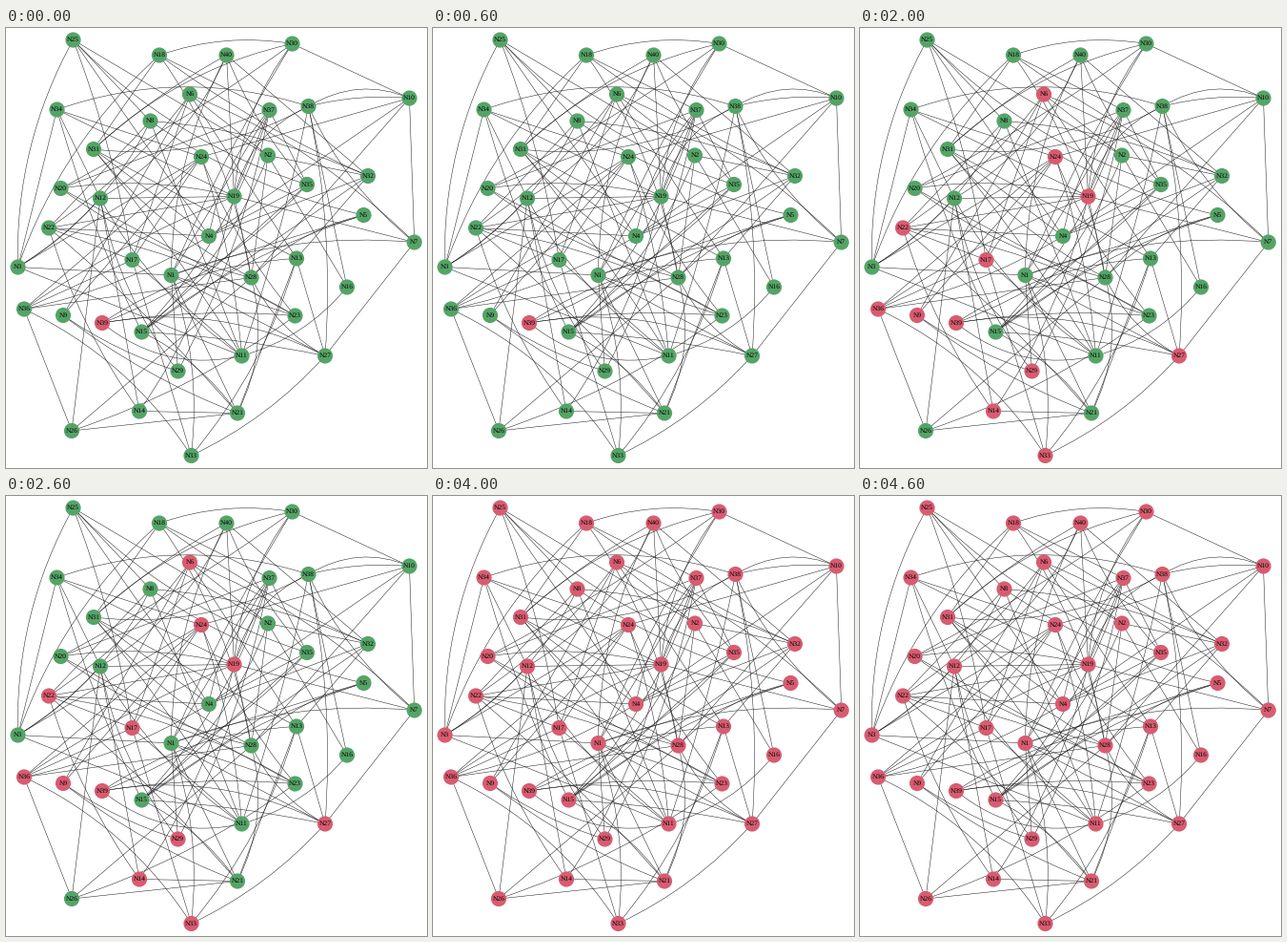
These frames come from a looping animation (442 px wide and 461 px high, 5000 ms). A matplotlib script:

```python
import random

import numpy as np
import matplotlib.pyplot as plt
from matplotlib.animation import FuncAnimation
from matplotlib.patches import Circle, PathPatch
from matplotlib.path import Path

W, H, DPI = 442, 461, 100
PX = 72 / DPI
RADIUS, CLEARANCE = 8.1, 15
HEALTHY, INFECTED = "#55a467", "#d85c70"
EDGE = "#1c1c1c"

plt.rcParams["text.hinting"] = "none"
rng = random.Random(12)

# Node centres for N1, N2, ... N40
nodes = np.array([
    (173.5, 259), (275, 133.5), (12.5, 250.5), (213, 218), (375.5, 196),
    (193, 69.5), (428.7, 224.5), (151.5, 97.5), (60, 301), (423.5, 73.5),
    (247.5, 343.5), (99, 178.5), (305, 241.5), (140, 401.5), (142.5, 318.5),
    (358, 271.5), (132.5, 243), (161, 28.5), (239.5, 176.5), (57.5, 168),
    (243, 403.5), (45, 209.5), (303.5, 301.5), (205, 135), (70.5, 12.5),
    (69, 422), (335, 343.5), (257.5, 261.5), (180.5, 359.5), (300.5, 16.5),
    (92, 127), (380, 155), (194.5, 448), (53.5, 85.5), (316, 164),
    (19, 294.5), (276.5, 86), (317.5, 82), (101, 309), (231.5, 28.5),
])
count = len(nodes)
centre = nodes.mean(axis=0)

# Links along the rim; the inner ones are drawn at random
rim = [(18, 30), (30, 10), (10, 7), (7, 27), (27, 33), (33, 36), (36, 26),
       (26, 21), (14, 21), (25, 3), (25, 8), (34, 3), (40, 32), (38, 7)]

# Nodes reached at each step of the spread
everyone = set(range(1, count + 1))
first = {39}
second = first | {17, 22, 33}
third = second | {6, 9, 14, 19, 24, 27, 29, 36}
fourth = everyone - {2, 8, 10, 16, 25, 26, 35}
steps = [first, second, third, fourth, everyone]


def fits(a, b):
    """Long enough, and crossing the middle of the graph."""
    p, q = nodes[a - 1], nodes[b - 1]
    inner = np.hypot(*((p + q) / 2 - centre)) < 155
    return inner and 85 < np.hypot(*(q - p)) < 290


def random_links(fanout=3):
    links = {tuple(sorted(pair)) for pair in rim}
    for a in sorted(everyone):
        choices = [b for b in sorted(everyone)
                   if fits(a, b) and (min(a, b), max(a, b)) not in links]
        for b in rng.sample(choices, min(fanout, len(choices))):
            links.add((min(a, b), max(a, b)))
    return sorted(links)


def detour(a, b):
    """Bow that carries a link around the nodes in its way."""
    p, q = nodes[a - 1], nodes[b - 1]
    d = q - p
    length = np.hypot(*d)
    normal = np.array([d[1], -d[0]]) / length
    bow = 0
    for i, node in enumerate(nodes, 1):
        t = (node - p) @ d / length**2
        gap = (node - p) @ normal
        if i in (a, b) or not 0.15 < t < 0.85 or abs(gap) > CLEARANCE - 3:
            continue
        side = -1 if gap > 0 else 1
        push = side * (CLEARANCE - abs(gap)) / (2 * t * (1 - t))
        bow = max(bow, push, key=abs)
    return bow * normal


def draw_link(ax, a, b, bend):
    p, q = nodes[a - 1], nodes[b - 1]
    curve = Path([p, (p + q) / 2 + bend, q],
                 [Path.MOVETO, Path.CURVE3, Path.CURVE3])
    ax.add_patch(PathPatch(curve, fc="none", ec=EDGE, lw=0.5 * PX, zorder=1))


fig = plt.figure(figsize=(W / DPI, H / DPI), dpi=DPI, facecolor="white")
ax = fig.add_axes([0, 0, 1, 1])
ax.set(xlim=(0, W), ylim=(H, 0))
ax.axis("off")

for a, b in random_links():
    draw_link(ax, a, b, detour(a, b))
for rise in (9, 27):
    draw_link(ax, 38, 10, np.array([0, -rise]))

discs = []
for i, (x, y) in enumerate(nodes, 1):
    discs.append(ax.add_patch(Circle((x, y), RADIUS, lw=0, zorder=2)))
    ax.text(x, y, f"N{i}", family="Liberation Serif", size=7.5 * PX,
            ha="center", va="center", color="black", zorder=3)


def update(k):
    for i, disc in enumerate(discs, 1):
        disc.set_facecolor(INFECTED if i in steps[k] else HEALTHY)
    return discs


anim = FuncAnimation(fig, update, frames=len(steps), interval=1000,
                     repeat=True, repeat_delay=0, blit=False)
plt.show()
```
